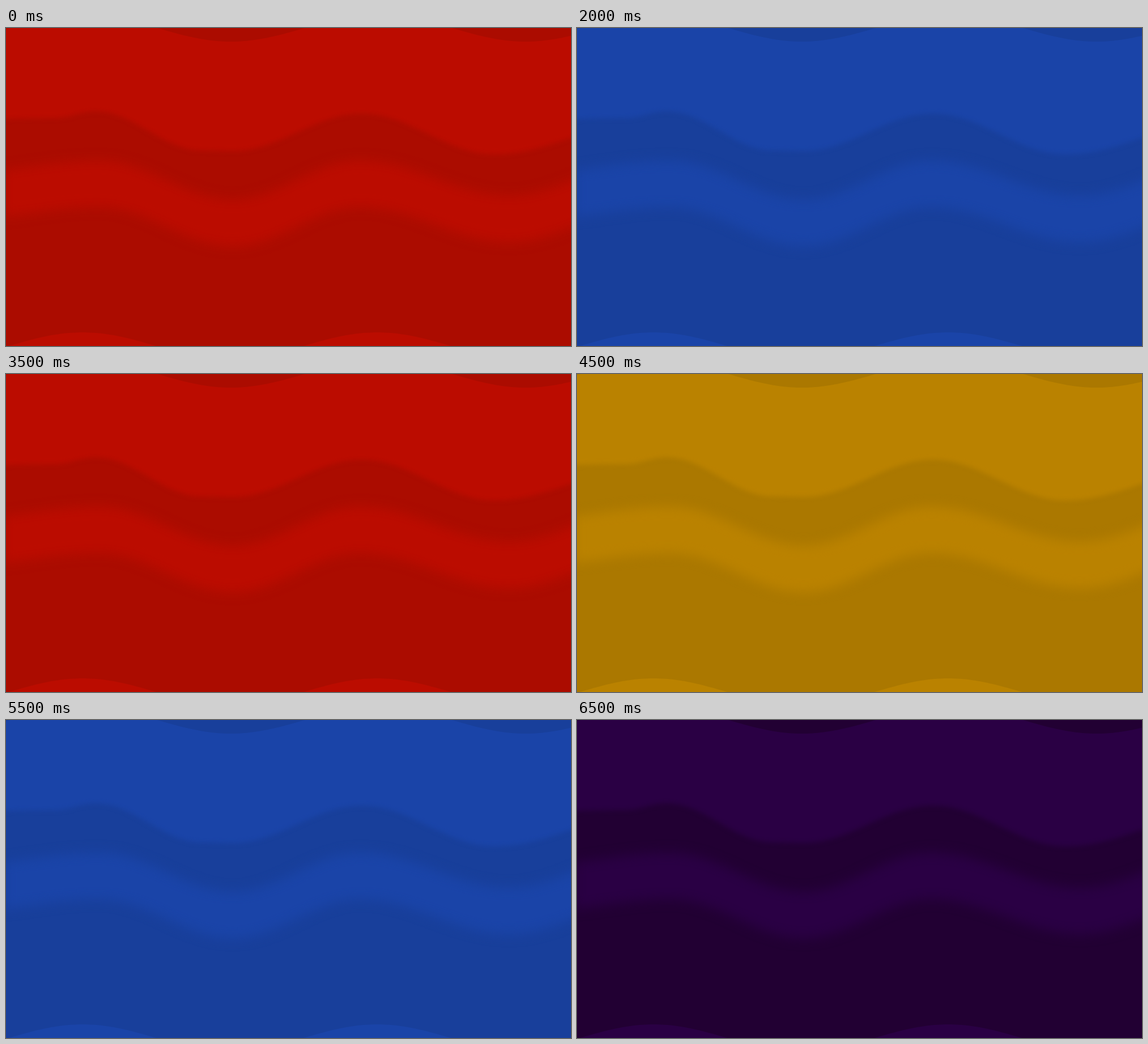
Write an HTML page that moves like this. It is 997 px wide and 561 px high and loops after 7 s.

```html
<!DOCTYPE html>
<html lang="en">
<head>
<meta charset="utf-8">
<title>Colour waves</title>
<style>
  html, body { margin: 0; width: 100%; height: 100%; overflow: hidden; }
  svg {
    display: block; width: 100vw; height: 100vh;
    animation: hues 3500ms step-end infinite;
  }
  path { fill: currentColor; }
  @keyframes hues {
    0%, 100% { color: #bb0c00; background-color: #ab0c00; }
    14.285%  { color: #bb4a00; background-color: #ab4400; }
    28.571%  { color: #ba8200; background-color: #ab7800; }
    42.857%  { color: #1f8420; background-color: #1c791d; }
    57.142%  { color: #1a44a8; background-color: #183f9b; }
    71.428%  { color: #281f80; background-color: #231c70; }
    85.714%  { color: #2a0044; background-color: #220033; }
  }
</style>
</head>
<body>
<svg viewBox="0 0 997 561" preserveAspectRatio="none">
  <defs>
    <filter id="soft" filterUnits="userSpaceOnUse" x="-60" y="-60" width="1117" height="681" color-interpolation-filters="sRGB">
      <feGaussianBlur stdDeviation="4"/>
    </filter>
    <filter id="softer" filterUnits="userSpaceOnUse" x="-60" y="-60" width="1117" height="681" color-interpolation-filters="sRGB">
      <feGaussianBlur stdDeviation="10"/>
    </filter>
    <clipPath id="below"><path id="ceiling"/></clipPath>
  </defs>
  <g clip-path="url(#below)"><path id="sky" filter="url(#soft)"/></g>
  <path id="band" filter="url(#softer)"/>
  <path id="floor"/>
</svg>
<script>
  const LEFT = -50, RIGHT = 1050, STEP = 5;

  // Cosine easing between neighbouring crests and troughs
  const wave = turns => x => {
    const i = turns.findIndex(([end]) => end >= x);
    const [[x0, y0], [x1, y1]] = [turns[i - 1], turns[i]];
    return y0 + (y1 - y0) * (1 - Math.cos(Math.PI * (x - x0) / (x1 - x0))) / 2;
  };

  const sine = (base, amplitude, crest) => x =>
    base + amplitude * Math.cos(2 * Math.PI * (x - crest) / 520);

  // Area between two curves
  function fillBetween(id, top, bottom, left = LEFT) {
    const upper = [], lower = [];
    for (let x = left; x <= RIGHT; x += STEP) {
      upper.push([x, top(x)]);
      lower.unshift([x, bottom(x)]);
    }
    document.getElementById(id).setAttribute('d', `M${[...upper, ...lower].join(' ')}Z`);
  }

  const skyEdge = wave([[-60, 161], [85, 159], [158, 147], [345, 216], [400, 217], [628, 151], [862, 223], [1130, 165]]);
  const bandEdge = wave([[-80, 248], [165, 226], [400, 295], [625, 226], [888, 288], [1120, 230]]);
  const above = () => -50, under = () => 620;

  fillBetween('ceiling', sine(0, 24, 397), under);
  fillBetween('sky', above, skyEdge);
  fillBetween('band', x => bandEdge(x) + 8, x => bandEdge(x) + 90, -5);
  fillBetween('floor', sine(561, -24, 135), under);
</script>
</body>
</html>
```
